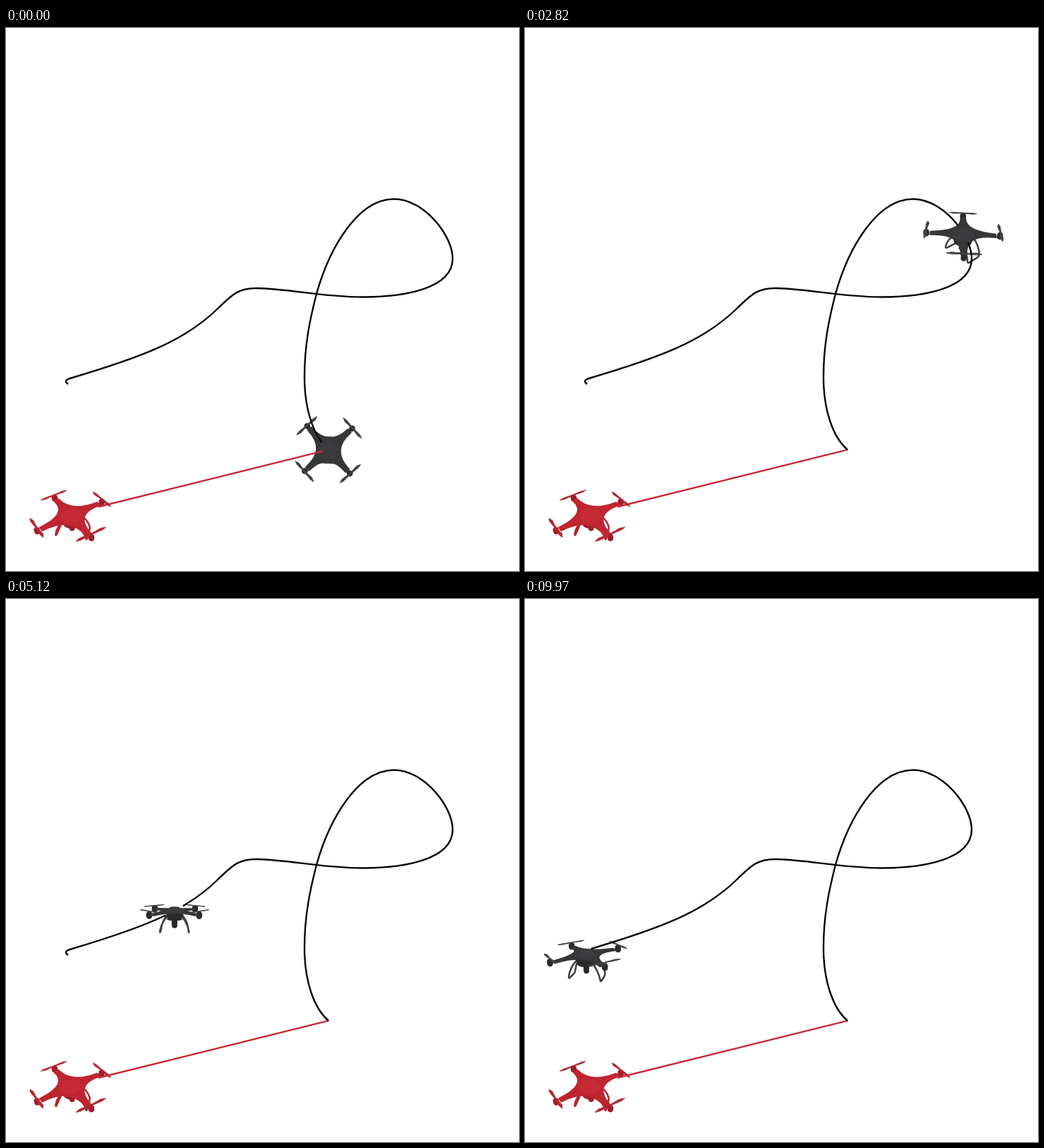
Recreate the animation shown at these times as an HTML page. Size 727 px wide and 770 px high, loop 10000 ms.

```html
<!DOCTYPE html>
<html lang="en">
<head>
<meta charset="utf-8">
<title>Drone flight path</title>
<style>
  html, body { margin: 0; width: 100%; height: 100%; overflow: hidden; background: #fff; }
  svg { display: block; width: 100vw; height: 100vh; }
</style>
</head>
<body>
<svg id="stage" viewBox="0 0 727 770"></svg>
<script>
const NS = 'http://www.w3.org/2000/svg';
const LOOP = 10000;
const HIDE = 14; // trail length covered by the drone on each side of its centre
const ROUTE = `M457,598 C436,580 423,541 423,495 S431,412 440,377
  C458,313 498,242.5 550,242.5 C592,242.5 633,294 633,327
  C633,370 563,381.5 505,381.5 S403,370 357,369
  C328,368 319,380 300,398 C252,445 188,468 92,496.5 C84,499 83,501 88,505`;
const stage = document.getElementById('stage');

function add(parent, name, attrs) {
  const el = document.createElementNS(NS, name);
  for (const k in attrs) el.setAttribute(k, attrs[k]);
  return parent.appendChild(el);
}

// Monotone cubic through (ts, vs), flat at both ends.
function track(ts, vs) {
  const n = ts.length;
  const d = ts.slice(1).map((t, i) => (vs[i + 1] - vs[i]) / (t - ts[i]));
  const m = ts.map((_, i) => {
    if (i === 0 || i === n - 1 || d[i - 1] * d[i] <= 0) return 0;
    return 2 * d[i - 1] * d[i] / (d[i - 1] + d[i]);
  });
  return t => {
    if (t <= ts[0]) return vs[0];
    if (t >= ts[n - 1]) return vs[n - 1];
    let i = 0;
    while (t > ts[i + 1]) i++;
    const h = ts[i + 1] - ts[i], u = (t - ts[i]) / h, v = 1 - u;
    return vs[i] * v * v * (1 + 2 * u) + vs[i + 1] * u * u * (3 - 2 * u)
      + h * (m[i] * u * v * v - m[i + 1] * u * u * v);
  };
}

// ---- Drone model: rotors at x, z = +-1, y points down ----
const CORNERS = [[-1, -1], [1, -1], [1, 1], [-1, 1]];
const DARK = { edge: '#2a2a2c', body: '#373739', dome: '#3c3c3e', blade: '#434345' };
const RED = { edge: '#9d1f2a', body: '#bf2530', dome: '#c62a34', blade: '#b32832' };

function makeDrone(c) {
  const g = add(stage, 'g', { 'stroke-linejoin': 'round', 'stroke-linecap': 'round' });
  const line = (stroke, w) => add(g, 'path', { fill: 'none', stroke, 'stroke-width': w });
  const solid = (fill, w) => add(g, 'path', { fill, stroke: fill, 'stroke-width': w });
  return {
    legs: line(c.blade, 2.6), camera: line(c.edge, 8), hull: solid(c.edge, 1),
    motors: line(c.edge, 8.5), body: solid(c.body, 3), dome: solid(c.dome, 1), blades: solid(c.blade, 1)
  };
}

// Angles in degrees; size is half the rotor spacing in pixels.
function projector(cx, cy, yaw, tilt, roll, size) {
  const [a, e, r] = [yaw, tilt, roll].map(v => v * Math.PI / 180);
  return (x, z, y) => {
    const side = x * Math.cos(a) - z * Math.sin(a);
    const near = x * Math.sin(a) + z * Math.cos(a);
    const down = near * Math.sin(e) + y * .93 * Math.cos(e);
    const k = size * (1 + .11 * (near * Math.cos(e) - y * Math.sin(e)));
    const px = cx + k * (side * Math.cos(r) - down * Math.sin(r));
    const py = cy + k * (side * Math.sin(r) + down * Math.cos(r));
    return px.toFixed(2) + ',' + py.toFixed(2);
  };
}

function drawDrone(parts, P) {
  const poly = pts => 'M' + pts.join('L') + 'Z';
  const ring = (r, y) => poly(Array.from({ length: 20 }, (_, i) => {
    const a = i * Math.PI / 10;
    return P(r * Math.cos(a), r * Math.sin(a), y);
  }));
  const set = (name, d) => parts[name].setAttribute('d', d);

  set('legs', [-1, 1].map(s =>
    `M${P(s * .3, -.28, .2)}Q${P(s * .55, -.34, .5)} ${P(s * .62, -.34, .88)}` +
    `Q${P(s * .63, -.34, 1)} ${P(s * .63, -.2, 1)}L${P(s * .63, .2, 1)}` +
    `Q${P(s * .63, .34, 1)} ${P(s * .62, .34, .88)}` +
    `Q${P(s * .55, .34, .5)} ${P(s * .3, .28, .2)}`).join(''));
  set('camera', `M${P(0, .05, .5)}L${P(0, .05, .7)}`);
  set('hull', [0, .1, .2, .3, .4].map(y => ring(.42 - y * .2, y)).join(''));
  set('motors', CORNERS.map(([x, z]) => `M${P(x, z, 0)}L${P(x, z, .08)}`).join(''));

  // Four tapered arms joined by curved waists.
  let star = '';
  CORNERS.forEach(([x, z], i) => {
    const [nx, nz] = CORNERS[(i + 1) % 4];
    const sideways = x === nx;
    const tip = (a, b) => sideways ? P(a * .94, b * .82, .05) : P(a * .82, b * .94, .05);
    const waist = sideways ? P(x * .08, 0, -.05) : P(0, z * .08, -.05);
    star += (i ? 'L' : 'M') + tip(x, z) + 'Q' + waist + ' ' + tip(nx, nz);
  });
  set('body', star + 'Z');
  set('dome', [.05, 0, -.05, -.1, -.15].map(y => ring(.36 + y, y)).join(''));

  // Blades stand square to their arms.
  set('blades', CORNERS.map(([x, z]) => {
    const at = (t, n) => P(x - z * t + x * n, z + x * t + z * n, -.13);
    return poly([at(-.42, 0), at(-.3, -.045), at(0, -.015), at(.3, -.045),
      at(.42, 0), at(.3, .03), at(0, .015), at(-.3, .03)]);
  }).join(''));
}

// ---- Scene ----
drawDrone(makeDrone(RED), projector(92, 690.5, 20, 40, -7, 37.5));
const darkDrone = makeDrone(DARK);
const tether = add(stage, 'line', { x1: 131, y1: 679, stroke: '#c52a37', 'stroke-width': 2.4 });
const trail = add(stage, 'path', { d: ROUTE, fill: 'none', stroke: '#050505', 'stroke-width': 2.4 });

// time, distance flown, yaw, tilt, roll, size
const keys = [
  [1360, 0, 90, 89, 3, 32],
  [2120, 360, 80, 46, -1, 33.5],
  [2360, 388, 66, 42, 0, 38],
  [3580, 733, 14, 21, 10, 34.5],
  [5120, 986, 1, 8, 0, 32],
  [6480, 1149, 16, 14, 2, 38],
  [7500, 1155, 20, 19, -3, 38]
];
const [travel, ...pose] = [1, 2, 3, 4, 5].map(k => track(keys.map(r => r[0]), keys.map(r => r[k])));

function render(t) {
  const s = travel(t);
  const c = trail.getPointAtLength(s);
  drawDrone(darkDrone, projector(c.x, c.y, ...pose.map(f => f(t))));

  const from = Math.max(0, s - HIDE);
  trail.setAttribute('stroke-dasharray', `${from} ${s + HIDE - from} 9999 0`);

  const cut = Math.max(0, 9 - s);
  tether.setAttribute('x2', 457.5 - cut);
  tether.setAttribute('y2', 597.8 + cut * .25);
}

function frame() {
  render(performance.now() % LOOP);
  requestAnimationFrame(frame);
}
frame();
</script>
</body>
</html>
```
